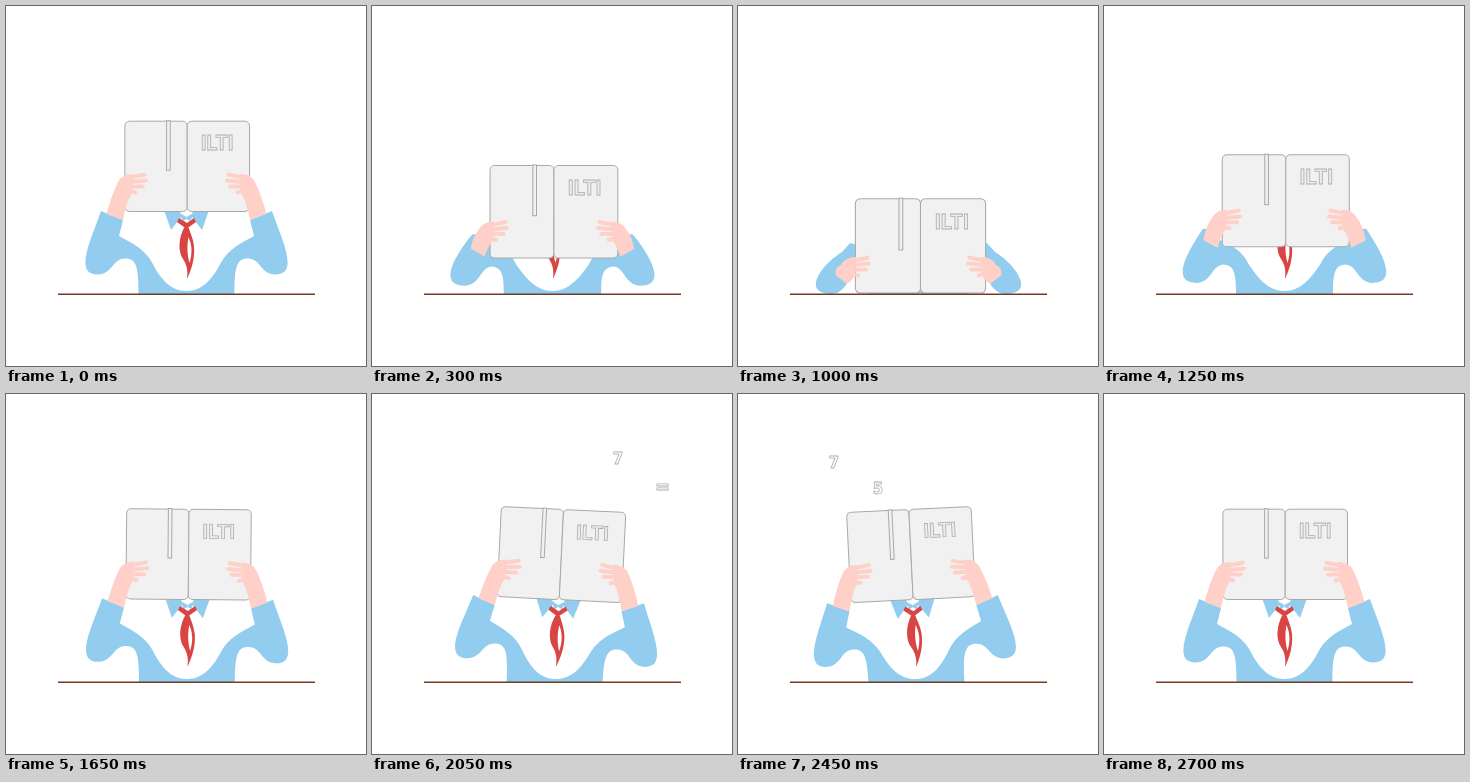
Write an HTML page that moves like this. It is 360 by 360 pixels and loops after 2800 ms.

```html
<!DOCTYPE html>
<html lang="en">
<head>
<meta charset="utf-8">
<title>Reader behind a book</title>
<style>
html, body { margin: 0; width: 100%; height: 100%; overflow: hidden; background: #fff; }
svg { display: block; width: 100vw; height: 100vh; }
text { font-weight: 700; text-anchor: middle; stroke: #acacac; stroke-width: .8; }
.title { font-family: Roboto, "Open Sans", sans-serif; font-size: 20px; fill: #ededed; }
.sign { font-family: "DejaVu Sans", sans-serif; fill: #fff; }
</style>
</head>
<body>
<svg viewBox="0 0 360 360">
  <defs>
    <clipPath id="above"><rect width="360" height="288"/></clipPath>
    <path id="sleeve" fill="#92cdef"/>
    <g id="hand" fill="#ffd0c8" stroke="#ffd0c8" stroke-linecap="round">
      <path id="palm" stroke="none"/>
      <path id="fingers" stroke-width="4"/>
    </g>
    <g id="collar" fill="#92cdef">
      <path d="M158 204H174L175 211L165 224Z"/>
      <path d="M172 206L180.5 211V213L177 215Z"/>
    </g>
  </defs>
  <g id="signs"></g>
  <g clip-path="url(#above)">
    <g id="person">
      <use href="#sleeve"/>
      <use href="#sleeve" transform="translate(361) scale(-1 1)"/>
      <use href="#collar"/>
      <use href="#collar" transform="translate(361) scale(-1 1)"/>
      <g fill="#d94545">
        <path d="M173 212L181 217L188 212L190 216L183 221H178L171 216Z"/>
        <path d="M179 220C172 232 172 246 177 253C181 259 182 265 181 273C186 262 189 252 188 240C187 232 184 226 182 220Z"/>
        <path fill="#fff" d="M182.5 231C180.5 241 181.5 250 183.5 257C186.5 247 186 239 182.5 231Z"/>
      </g>
      <g id="book" fill="#f1f1f1" stroke="#a9a9a9">
        <rect x="-62.3" width="62.3" height="90.3" rx="4.5"/>
        <rect width="62.3" height="90.3" rx="4.5"/>
        <rect x="-20.6" y="-.5" width="3.6" height="49.5"/>
        <text class="title" x="30" y="29">ILTI</text>
      </g>
      <use href="#hand"/>
      <use href="#hand" transform="translate(361) scale(-1 1)"/>
    </g>
  </g>
  <path d="M52 288.3H309" stroke="#733c22" stroke-width="1.6"/>
</svg>
<script>
const LOOP = 2800, STEP = 50, TILT = 3.2;
const $ = id => document.getElementById(id);
const set = (id, name, value) => $(id).setAttribute(name, value);
const part = (t, a, b) => Math.max(0, Math.min(1, (t - a) / (b - a)));
const smooth = u => (1 - Math.cos(Math.PI * u)) / 2;

// Signs drift up from behind the book, one pair for each lean
const signs = [
  { ch: "7", born: 1650, x: 202, y: 100, vx: .11 },
  { ch: "=", born: 1650, x: 226.5, y: 129, vx: .16 },
  { ch: "7", born: 2080, x: 133, y: 101.5, vx: -.1 },
  { ch: "5", born: 2200, x: 155, y: 116.5, vx: -.06 }
];
for (const s of signs) {
  s.size = s.ch === "=" ? 18 : 15;
  s.drop = s.size * (s.ch === "=" ? .31 : .38);
  s.end = s.vx > 0 ? 2320 : 2680;
  s.el = document.createElementNS("http://www.w3.org/2000/svg", "text");
  s.el.textContent = s.ch;
  s.el.setAttribute("class", "sign");
  s.el.setAttribute("font-size", s.size);
  $("signs").append(s.el);
}

function crouch(t) {
  const settle = .012 * Math.sin(Math.PI * part(t, 550, 1000));
  return smooth(part(t, 0, 550)) * (1 - smooth(part(t, 1000, 1460))) - settle;
}

function sway(t) {
  if (t < 1985) return TILT * Math.sin(Math.PI / 2 * part(t, 1615, 1985));
  if (t < 2370) return TILT * Math.cos(Math.PI * part(t, 1985, 2370));
  return -TILT * (1 - smooth(part(t, 2370, 2700)));
}

// Each key point slides by (dx, dy) as the crouch goes from 0 to 1
function drawArm(d) {
  const p = (x, y, dx = 0, dy = 0) => `${x + dx * d} ${y + dy * d} `;
  set("sleeve", "d",
    "M" + p(95, 205, 9, 41) +
    "C" + p(86, 232, -2, 26) + p(66, 270, -4, 18) + p(93, 268.5, 1, 19.5) +
    "C" + p(107, 267, 2, 20) + p(106, 253, 4, 16) + p(119, 252.5, 0, 14) +
    "C" + p(131, 252, 0, 16) + p(133, 262, -1, 14) + p(132.5, 296, -1.5) +
    "H181V285H180.5" +
    "C" + p(164, 285) + p(154, 272) + p(146, 256.5, -3, 4) +
    "C" + p(139, 244, 0, 4) + p(128, 238, 5, 6) + p(113, 230, 7, 9) +
    "L" + p(117, 214, -5, 23) + "Z");

  const f = (x, y) => p(x, y, -9, 83);
  set("palm", "d",
    "M" + p(100.5, 208, -3, 61) + "Q" + p(106, 188, -9, 73) + f(112, 176) +
    "Q" + f(116, 168) + f(127, 168) + "L" + f(126, 187) +
    "Q" + p(121, 194, -9, 82) + p(117, 214, -8, 64) + "Z");
  let lines = "";
  for (let i = 0; i < 4; i++)
    lines += "M" + f(122, 172 + 4.2 * i) + "L" + f(140 - 2.2 * (i - .8) ** 2, 168.7 + 5.9 * i);
  set("fingers", "d", lines);
}

function draw(t) {
  const d = crouch(t);
  drawArm(d);
  set("book", "transform",
    `translate(${181.2 + 1.3 * d} ${115.2 + 77.5 * d}) scale(${1 + .045 * d})`);
  set("person", "transform", `rotate(${sway(t)} 181 331)`);
  for (const s of signs) {
    const age = t - s.born;
    s.el.setAttribute("x", s.x + s.vx * age);
    s.el.setAttribute("y", s.y + s.drop - .09 * age);
    s.el.setAttribute("opacity", part(age, 0, 150) * (1 - part(t, s.end - 190, s.end)));
  }
}

const start = performance.now();
function tick() {
  const t = (performance.now() - start) % LOOP;
  draw(Math.floor(t / STEP) * STEP);
  requestAnimationFrame(tick);
}
tick();
</script>
</body>
</html>
```
